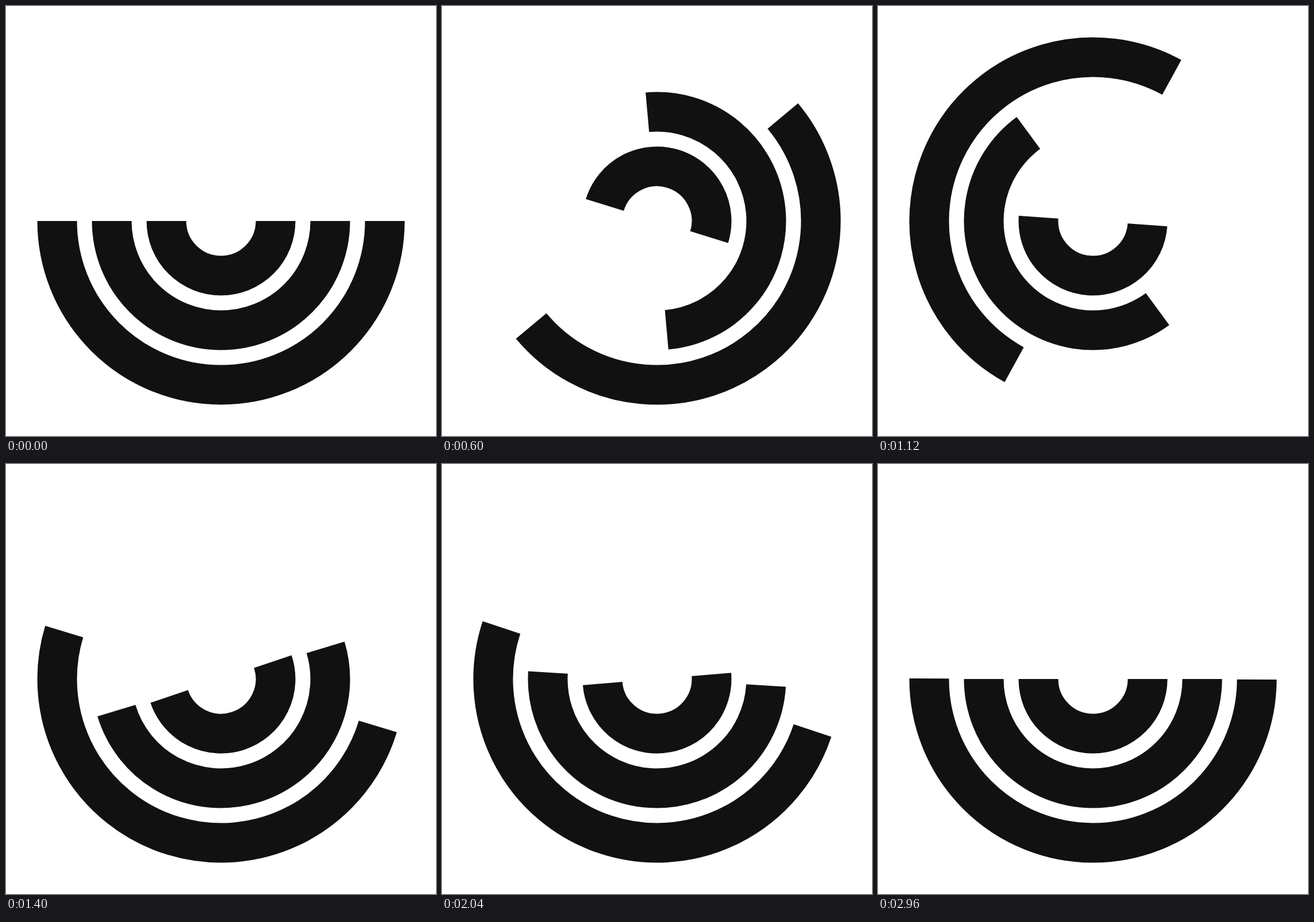
Recreate the animation shown at these times as an HTML page. Size 748 by 748 pixels, loop 3000 ms.

```html
<!DOCTYPE html>
<html lang="en">
<head>
<meta charset="utf-8">
<title>Swinging arcs</title>
<style>
  html, body { margin: 0; width: 100%; height: 100%; overflow: hidden; background: #fff; }
  svg { display: block; width: 100vw; height: 100vh; }
  path { fill: none; stroke: #111; stroke-width: 69; }
</style>
</head>
<body>
<svg viewBox="-374 -374 748 748">
  <path d="M-95 0A95 95 0 0 0 95 0"/>
  <path d="M-190 0A190 190 0 0 0 190 0"/>
  <path d="M-285 0A285 285 0 0 0 285 0"/>
</svg>
<script>
  const LOOP = 3000;
  const STEP = 40;   // ms each picture is held
  const DELAY = 10;  // ticks between neighbouring arcs, 60 ticks per second

  // [tick, degrees counterclockwise]
  const keys = [[0, 0], [80, 383], [100, 341], [120, 365], [140, 357], [160, 360]];
  const arcs = [...document.querySelectorAll('path')];
  const ease = u => u * u * (3 - 2 * u);

  function angleAt(tick) {
    if (tick <= 0) return 0;
    const i = keys.findIndex(([end]) => tick < end);
    if (i < 0) return 360;
    const [t0, a0] = keys[i - 1];
    const [t1, a1] = keys[i];
    return a0 + (a1 - a0) * ease((tick - t0) / (t1 - t0));
  }

  function draw(ms) {
    const tick = Math.floor(Math.floor(ms / STEP) * 12 / 5);
    arcs.forEach((arc, i) =>
      arc.setAttribute('transform', `rotate(${-angleAt(tick - i * DELAY)})`));
  }

  const start = performance.now();
  function loop() {
    // 1 ms of slack absorbs clock rounding
    draw((performance.now() - start + 1) % LOOP);
    requestAnimationFrame(loop);
  }
  loop();
</script>
</body>
</html>
```
